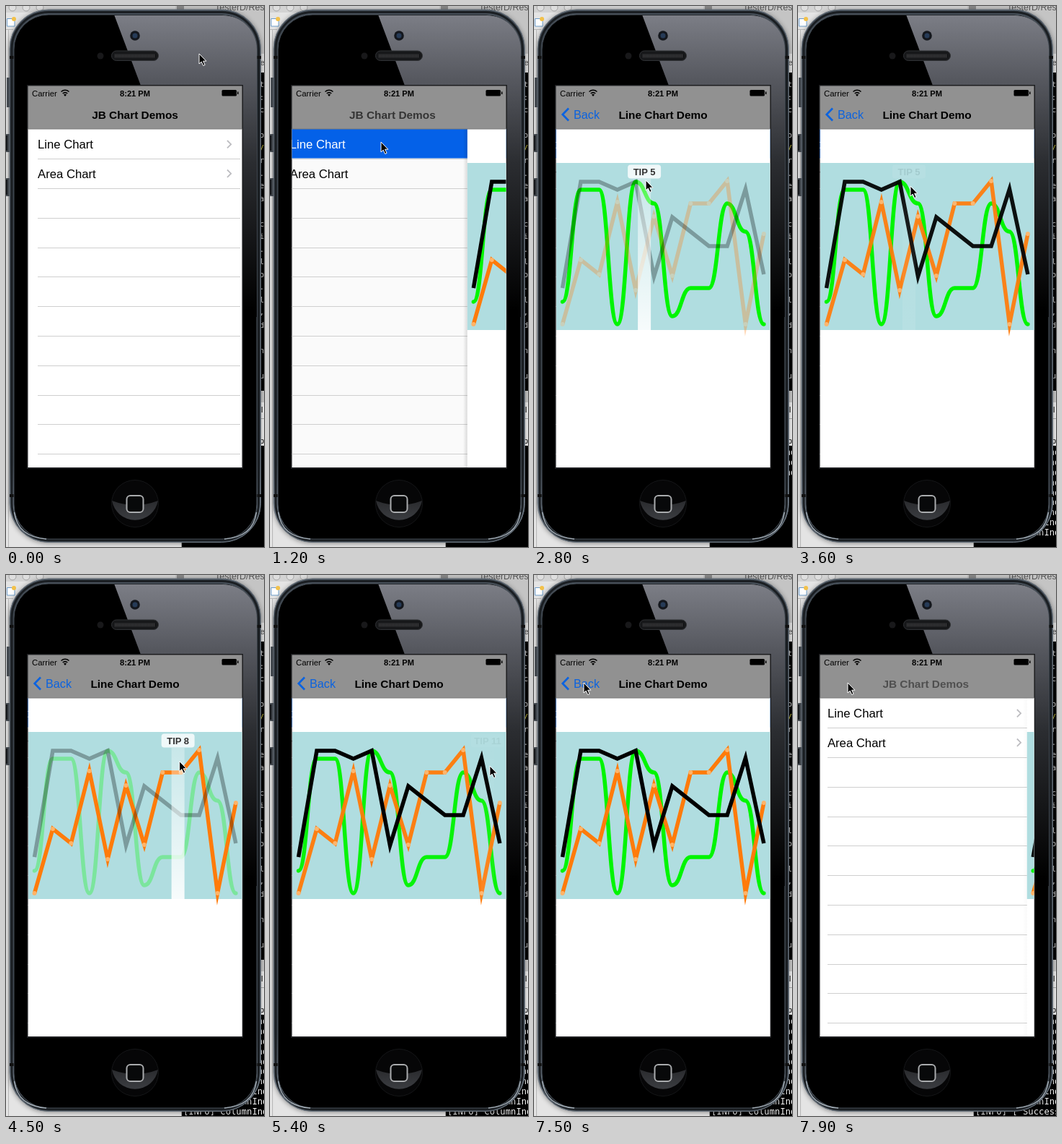
These frames come from a looping animation (358x748 px, 8000 ms). An HTML page:

```html
<!DOCTYPE html>
<html lang="en">
<head>
<meta charset="utf-8">
<title>Chart demo</title>
<style>
html, body { margin: 0; width: 100%; height: 100%; overflow: hidden; background: #e4e4e4; }
svg { display: block; width: 358px; height: 748px; font-family: "Liberation Sans", Arial, sans-serif; }
.mono { font-family: "DejaVu Sans Mono", monospace; font-size: 12.2px; white-space: pre; }
.title { font-weight: bold; font-size: 15.4px; text-anchor: middle; }
.cell { font-size: 16.7px; }
.body { filter: drop-shadow(0 1px 3px #0006); }
</style>
</head>
<body>
<svg viewBox="0 0 358 748">
  <defs>
    <linearGradient id="gloss" x1="0" y1="12" x2="0" y2="420" gradientUnits="userSpaceOnUse">
      <stop offset="0" stop-color="#7c7e86"/><stop offset=".22" stop-color="#56585f"/>
      <stop offset=".5" stop-color="#2b2d31"/><stop offset="1" stop-color="#000"/>
    </linearGradient>
    <linearGradient id="rim" x1="0" y1="0" x2="0" y2="1">
      <stop offset="0" stop-color="#49525c"/><stop offset=".1" stop-color="#343b43"/>
      <stop offset=".85" stop-color="#3c444d"/><stop offset=".95" stop-color="#6f7a86"/>
      <stop offset="1" stop-color="#3a424a"/>
    </linearGradient>
    <linearGradient id="home" x1="0" y1="0" x2="0" y2="1">
      <stop offset="0" stop-color="#2a2b2e"/><stop offset="1" stop-color="#3b3d41"/>
    </linearGradient>
    <linearGradient id="shade">
      <stop offset="0" stop-opacity="0"/><stop offset="1" stop-opacity=".14"/>
    </linearGradient>
    <linearGradient id="beam" x1="0" y1="0" x2="0" y2="1">
      <stop offset="0" stop-color="#fff" stop-opacity=".3"/><stop offset="1" stop-color="#fff" stop-opacity=".9"/>
    </linearGradient>
    <clipPath id="screen"><path d="M30.500 110.500H327.500V638H30.500z"/></clipPath>
    <clipPath id="face"><rect x="12" y="13" width="336" height="723" rx="47"/></clipPath>
  </defs>

  <!-- desktop behind the phone -->
  <path fill="#e4e4e4" d="M0 0H358V748H0z"/>
  <path fill="#d3d3d3" d="M0 0H358V9H0z"/>
  <g fill="#dedede" stroke="#a5a5a5"><circle cx="9" cy="2" r="5"/><circle cx="28" cy="2" r="5"/><circle cx="47" cy="2" r="5"/></g>
  <path fill="#c4c4c4" d="M235 0H358V66H235z"/>
  <path fill="#888" d="M237 0H247V5H237z"/>
  <text x="290" y="6" font-size="12.500" fill="#555">TesterD/Res</text>
  <path fill="#fff" stroke="#6d9cc8" d="M1.500 17.500H12V28H1.500z"/><circle cx="11" cy="18" r="3" fill="#f2c14a"/>
  <path stroke="#b7b7b7" d="M0 32.500H10M3.500 33V748"/>
  <path fill="#e2e2e2" d="M340 66H358V92H340z"/>
  <text x="349" y="82" font-size="11" fill="#444">re</text>
  <path d="M340 92H358V532H340zM244 608H358V748H244z"/>
  <path fill="#c9c9c9" d="M340 532H358V548H340z"/><path fill="#f1f1f1" d="M340 548H358V608H340z"/>
  <path stroke="#aaa" d="M243.500 700V748M340 570.500H358"/>
  <text x="354" y="562" font-size="11">l</text><text x="352" y="605" font-size="11">p</text>
  <g id="shell" class="mono" fill="#ddd" style="font-size:10px"></g>
  <g id="log" class="mono" fill="#f2f2f2"></g>

  <!-- phone body -->
  <path fill="#4b5158" d="M1 99H7V140H1zM0 177H7V202H0zM0 238H7V263H0z"/>
  <path fill="#15181b" d="M0 179H2V200H0zM0 240H2V261H0z"/>
  <rect class="body" x="5" y="5" width="348.500" height="736.500" rx="54" fill="url(#rim)" stroke="#68727c"/>
  <rect x="8" y="8.500" width="342.500" height="730" rx="51" fill="none" stroke="#1a1e22" stroke-width="3"/>
  <path stroke="#111" stroke-width="4" d="M5 71H11M348 71H354M5 677H11M348 677H354"/>
  <rect x="11" y="12" width="337" height="725" rx="48" stroke="#454d55"/>
  <path fill="none" stroke="#a3adb6" stroke-width="1.500" d="M11.500 700Q16 734 56 737M347.500 700Q343 734 303 737"/>
  <path clip-path="url(#face)" fill="url(#gloss)" d="M150 12H349V430H328V110H187z"/>
  <circle cx="179" cy="41" r="6.800" fill="#14171d"/><circle cx="179" cy="41" r="3.500" fill="#263b57"/>
  <circle cx="131" cy="69" r="4.500" fill="#18181a"/>
  <rect x="146.500" y="62" width="65" height="13.500" rx="6.700" fill="#17181a" stroke="#303235"/>
  <path stroke="#404042" stroke-width="5" stroke-dasharray="1 1" d="M151 69H207"/>
  <circle cx="179" cy="688" r="32.500" fill="#060607" stroke="#151618"/>
  <path fill="url(#home)" d="M147 684Q179 696 211 684A32.500 32.500 0 0 1 147 684z"/>
  <rect x="167.500" y="677" width="23" height="23" rx="5" fill="#08090a" stroke="#a9abad" stroke-width="2"/>
  <path fill="#1c1d1f" d="M29 109H329V640H29z"/>

  <!-- screen -->
  <g clip-path="url(#screen)">
    <g id="list">
      <path id="listBg" fill="#fff" d="M30 170H460V638H30z"/>
      <path id="pick" fill="#0461e8" d="M30 170H460V210.500H30z"/>
      <g id="rules" stroke="#cfcfcf"></g>
      <text id="firstCell" class="cell" x="44" y="197">Line Chart</text>
      <text class="cell" x="44" y="237.500">Area Chart</text>
      <path fill="none" stroke="#bdbdc1" stroke-width="1.800" d="M307 186l5.200 5.200-5.200 5.200M307 226.500l5.200 5.200-5.200 5.200"/>
    </g>
    <g id="page">
      <path id="edge" fill="url(#shade)" d="M25 170H31V638H25z"/>
      <path fill="#fff" d="M31 170H328V638H31z"/>
      <path fill="#b0dde0" d="M31 217H328V448H31z"/>
      <g id="lines" fill="none" stroke-width="5.500" stroke-miterlimit="10"></g>
      <g id="tip">
        <rect x="-9" y="239" width="18" height="209" fill="url(#beam)"/>
        <rect x="-23" y="219.500" width="46" height="19" rx="4" fill="#fff" opacity=".8"/>
        <text id="tipText" y="233.500" font-size="13" font-weight="bold" fill="#333" text-anchor="middle"></text>
      </g>
    </g>
    <path fill="#919191" d="M30 110H328V170H30z"/><path stroke="#7b7b7b" d="M30 170H328"/>
    <text x="36" y="124.500" font-size="11.400">Carrier</text>
    <path fill="none" stroke="#000" stroke-width="1.600" d="M76.500 118.500q5.500-4.500 11 0M78.700 121q3.300-2.700 6.600 0"/>
    <path d="M80 122.500q2-1.500 4 0L82 125z"/>
    <text x="179" y="124.500" font-size="11.100" font-weight="bold" text-anchor="middle">8:21 PM</text>
    <rect x="299.500" y="116" width="20.500" height="8.500" rx="1.500"/><path d="M321 118.500h1.500v3.500H321z"/>
    <text id="listTitle" class="title" y="155.500">JB Chart Demos</text>
    <text id="pageTitle" class="title" y="155.500">Line Chart Demo</text>
    <g id="back" fill="#0b63e0">
      <path fill="none" stroke="#0b63e0" stroke-width="2.700" d="M48 141.500L39.700 150 48 158.500"/>
      <text x="55" y="155.500" font-size="16.200">Back</text>
    </g>
  </g>
  <path id="cursor" stroke="#fff" d="M0 0V14l3.200-2.900 2.500 5.400 2.400-1.100-2.500-5.200h4.300z"/>
</svg>
<script>
const $ = id => document.getElementById(id);
const clamp = (v, lo = 0, hi = 1) => Math.min(hi, Math.max(lo, v));
const set = (el, attrs) => { for (const k in attrs) el.setAttribute(k, attrs[k]); };
const add = (parent, tag, attrs, text = "") => {
  const el = document.createElementNS("http://www.w3.org/2000/svg", tag);
  set(el, attrs);
  el.textContent = text;
  return parent.appendChild(el);
};

const LOOP = 8000, WIDTH = 297, X0 = 39.5, STEP = 25.4;
const PUSH = 1150, POP = 7565;
const px = i => X0 + i * STEP;
const series = [
  { color: "#00f500", smooth: true, y: [409, 254, 254, 440, 243, 273, 429, 390, 390, 273, 312, 440] },
  { color: "#ff7b0a", dots: true, y: [440, 351, 371, 271, 393, 291, 373, 273, 273, 242, 440, 315] },
  { color: "#000", y: [390, 243, 243, 254, 243, 374, 292, 312, 332, 332, 253, 371] }
];
const taps = [[2600, 3375], [4200, 5165], [5750, 6180]];
// time, x, y
const route = [[0, 268, 66], [1000, 154, 188], [1200, 154, 188], [1800, 155, 202], [2600, 155, 240],
  [3600, 156, 249], [3900, 156, 249], [5000, 305, 264], [5400, 305, 264], [5800, 249, 260],
  [6400, 249, 260], [7400, 69, 149], [8000, 69, 149]];

for (let k = 1; k < 12; k++) {
  const y = Math.round(170.3 + 40.8 * k) + .5;
  add($("rules"), "path", { d: `M44 ${y}H325` });
}

for (const s of series) {
  s.el = add($("lines"), "g", {});
  const d = s.y.map((y, i) => {
    if (!i) return `M${px(0)} ${y}`;
    const mid = px(i - .5);
    return s.smooth ? `C${mid} ${s.y[i - 1]} ${mid} ${y} ${px(i)} ${y}` : `L${px(i)} ${y}`;
  }).join("");
  add(s.el, "path", { d, stroke: s.color, "stroke-linecap": s.smooth ? "round" : "butt" });
  if (s.dots) s.y.forEach((y, i) => add(s.el, "circle", { cx: px(i), cy: y, r: 3, fill: "#ffb469", stroke: "none" }));
}

[..."t:c o/r.ea ci.lo.l,d n u"].forEach((ch, i) =>
  add($("shell"), "text", { x: 352, y: 112 + i * 17.5, fill: i == 5 ? "#e5dc4a" : "#ddd" }, ch));
const log = Array.from({ length: 10 }, (_, k) =>
  add($("log"), "text", { x: 246, y: 621.3 + 13.8 * k }, "[INFO] ColumnIndex"));

const spring = ms => { const u = Math.max(0, ms) * .0155; return 1 - (1 + u) * Math.exp(-u); };

function cursorAt(t) {
  const i = route.findIndex((r, n) => n && t <= r[0]);
  const [a, b] = [route[i - 1], route[i]];
  const u = (t - a[0]) / (b[0] - a[0]), e = u * u * (3 - 2 * u);
  return [a[1] + (b[1] - a[1]) * e, a[2] + (b[2] - a[2]) * e];
}

function draw(t) {
  const popping = t > POP;
  const p = popping ? 1 - spring(t - POP) : spring(t - PUSH);
  const [cx, cy] = cursorAt(t);
  set($("cursor"), { transform: `translate(${cx} ${cy})` });

  set($("page"), { transform: `translate(${(1 - p) * WIDTH})`, visibility: p > 0 ? "visible" : "hidden" });
  set($("edge"), { opacity: clamp(p * 5) });
  set($("list"), { transform: `translate(${-p * WIDTH * .3})` });
  const picked = t >= 1050 && !popping;
  set($("pick"), { visibility: picked ? "visible" : "hidden" });
  set($("firstCell"), { fill: picked ? "#fff" : "#000" });
  set($("listBg"), { fill: p > .1 ? "#fafafa" : "#fff" });

  const away = (t - POP) / 200;
  const pageFade = popping ? clamp(1 - away) : clamp((p - .3) / .65);
  set($("listTitle"), { x: 179 - 50 * p, opacity: popping ? clamp((away - 1) / 1.5) : clamp(1 - 2 * p) });
  set($("pageTitle"), { x: 179 + 130 * (1 - p), opacity: pageFade });
  set($("back"), { opacity: pageFade });

  const touch = Math.max(...taps.map(([on, off]) => Math.min(clamp((t - on) / 200), clamp(1 - (t - off) / 250))));
  const col = clamp(Math.floor((cx - X0) / STEP), 0, 11);
  const gap = s => Math.abs(s.y[col] - cy);
  const nearest = series.reduce((a, b) => gap(b) < gap(a) ? b : a);
  for (const s of series) set(s.el, { opacity: s == nearest ? 1 : 1 - .7 * touch });
  set($("tip"), { opacity: touch, transform: `translate(${clamp(cx - 2, 55, 302)})` });
  $("tipText").textContent = "TIP " + (col + 1);

  const count = t < 2600 ? 0 : t < 4200 ? Math.min(9, 1 + Math.floor((t - 2600) / 90)) : 10;
  log.forEach((el, k) => set(el, { visibility: k < count ? "visible" : "hidden" }));
  log[9].textContent = t >= 7700 ? '[INFO] ["Success"' : "[INFO] ColumnIndex";
}

const start = performance.now();
function tick() {
  const t = (performance.now() - start) % LOOP;
  draw(Math.floor(t / 100) * 100);
  requestAnimationFrame(tick);
}
tick();
</script>
</body>
</html>
```
